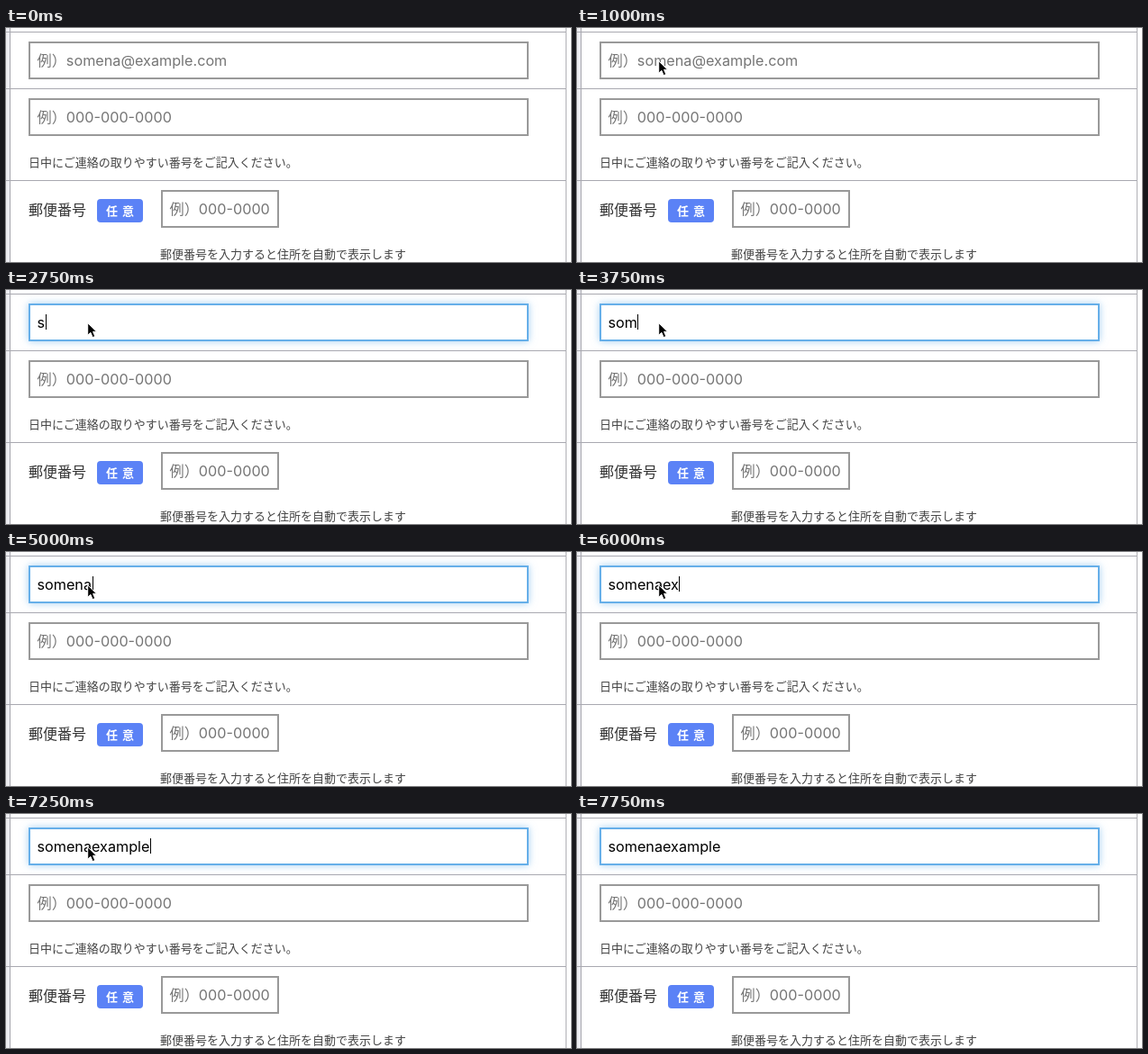
These frames come from a looping animation (627 by 260 pixels, 8000 ms). An HTML page:

```html
<!DOCTYPE html>
<html lang="ja">
<head>
<meta charset="utf-8">
<title>Form input</title>
<style>
html, body { margin: 0; width: 100%; height: 100%; overflow: hidden; background: #fff; }
body { position: relative; font: 16.2px Inter, "Noto Sans CJK JP", "Noto Sans CJK", sans-serif; color: #333; }
body > * { position: absolute; box-sizing: border-box; white-space: nowrap; }
.side { left: 0; top: 0; width: 5px; height: 260px; background: #ececf0; border-right: 1px solid #a6a6ae; }
.edge { left: 621px; top: 0; width: 1px; height: 260px; background: #b0b0b6; }
.row { left: 0; width: 621px; height: 1px; background: #a9a9b0; }
.field { left: 25px; width: 555px; height: 42px; border: 2px solid #999; background: #fff;
  padding-left: 7.5px; line-height: 38px; color: #757575; }
.focus { border-color: #66afe9; box-shadow: 0 0 8px rgba(102, 175, 233, .6); }
.typed { color: #000; }
.caret { position: absolute; top: 10px; width: 1px; height: 17px; background: #000; }
.label { left: 25px; top: 190px; font-size: 16px; line-height: 24px; }
.note { font-size: 13px; line-height: 20px; font-weight: 500; color: #444; }
.badge { left: 100.5px; top: 189.5px; width: 51px; height: 26.5px; border-radius: 4px; background: #5b82f6;
  color: #fff; font-size: 13px; font-weight: 700; line-height: 26px; letter-spacing: 5px; padding-left: 10.5px; }
</style>
</head>
<body>
<div class="side"></div>
<div class="row" style="top:4px"></div>
<div class="row" style="top:67px"></div>
<div class="row" style="top:169px"></div>
<div class="edge"></div>

<div class="field" id="email" style="top:15px"><span id="text"></span><i class="caret" id="caret"></i></div>
<div class="field" style="top:78px">例）000-000-0000</div>
<div class="note" style="left:25px;top:139px">日中にご連絡の取りやすい番号をご記入ください。</div>
<div class="label">郵便番号</div>
<div class="badge">任意</div>
<div class="field" style="left:172px;top:180px;width:131px">例）000-0000</div>
<div class="note" style="left:171px;top:241px">郵便番号を入力すると住所を自動で表示します</div>

<svg id="pointer" width="14" height="20" viewBox="0 0 14 20">
  <path d="M.7 .8V14.2L3.9 11.3L6.1 16.6L8.8 15.5L6.6 10.3H10.6Z" fill="#000" stroke="#fff" stroke-width="1"/>
</svg>

<script>
const LOOP = 8000, FOCUS = 1500, CARET_OFF = 2000, END = 7750;
const PLACEHOLDER = '例）somena@example.com', TYPED = 'somenaexample';
const keyTimes = [2750, 3250, 3750, 4250, 4500, 5000, 5500, 6000, 6250, 6500, 6750, 7000, 7250];
const pointerStops = [[500, 98, 24], [750, 89, 34], [1000, 89.5, 36]];
const [email, text, caret, pointer] =
  ['email', 'text', 'caret', 'pointer'].map(id => document.getElementById(id));

function render(t) {
  const count = keyTimes.filter(k => k <= t).length;
  email.classList.toggle('focus', t >= FOCUS);
  email.classList.toggle('typed', count > 0);
  text.textContent = count ? TYPED.slice(0, count) : PLACEHOLDER;

  const caretOn = (t >= FOCUS && t < CARET_OFF) || (count > 0 && t < END);
  caret.style.display = caretOn ? 'block' : 'none';
  caret.style.left = (count ? Math.round(8 + text.offsetWidth) : 8) + 'px';

  const stop = pointerStops.filter(([at]) => at <= t).pop();
  pointer.style.display = stop && t < END ? 'block' : 'none';
  if (stop) {
    pointer.style.left = stop[1] + 'px';
    pointer.style.top = stop[2] + 'px';
  }
}

function frame() {
  render(performance.now() % LOOP);
  requestAnimationFrame(frame);
}
frame();
</script>
</body>
</html>
```
